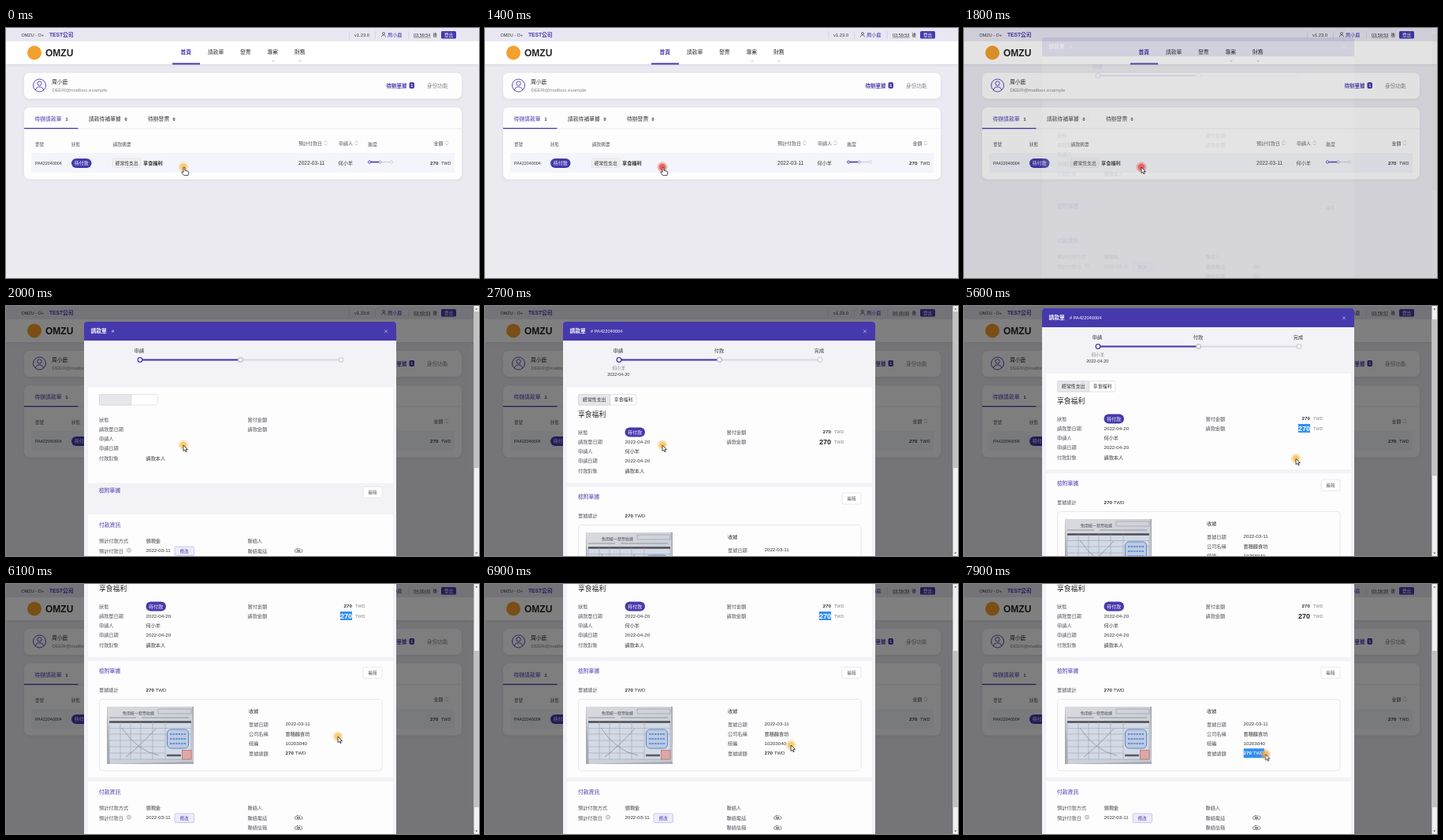
Write an HTML page that moves like this. It is 600x318 px and loops after 8000 ms.

```html
<!DOCTYPE html>
<html lang="zh-Hant">
<head>
<meta charset="utf-8">
<title>請款單</title>
<style>
html, body { margin: 0; width: 100%; height: 100%; overflow: hidden; background: #ebeaf0; }
svg { display: block; width: 600px; height: 318px; }
text {
  font: 6.2px "Liberation Sans", "Noto Sans CJK TC", "Noto Sans CJK", sans-serif;
  fill: #333; white-space: pre;
}
.s { font-size: 5.5px; }
.l { font-size: 6.8px; }
.b { font-weight: bold; }
.p { fill: #4539ad; }
.g { fill: #85858d; }
.w { fill: #fff; }
.m { text-anchor: middle; }
.label text { fill: #55555c; }

.shade, .modal, .bar, .scroll, .thumb, .late, .rows, .head2, .pay, .cursor, .hand, .arrow, .beam, .halo, .sel1, .sel2 {
  animation: 8s -20ms infinite step-end;
}
.shade { animation-name: shade; }
.modal { animation-name: modal; }
.bar { animation-name: bar; }
.scroll { animation-name: scroll; }
.thumb { animation-name: thumb; }
.late { animation-name: late; }
.rows { --d: -16px; animation-name: settle; }
.head2 { --d: -8px; animation-name: settle; }
.pay { --d: -118px; animation-name: settle; }
.cursor { animation-name: cursor; }
.hand { animation-name: hand; }
.arrow { animation-name: arrow; }
.beam { animation-name: beam; }
.halo { animation-name: halo; }
.sel1 { animation-name: sel1; }
.sel2 { animation-name: sel2; }

@keyframes shade {
  0% { opacity: 0; } 22.5% { opacity: .11; } 23.75% { opacity: .36; } 25%, 100% { opacity: .5; }
}
@keyframes modal {
  0% { opacity: 0; transform: translateY(-8px); }
  22.5% { opacity: .11; transform: translateY(-8px); }
  23.75% { opacity: .7; transform: translateY(-3px); }
  25%, 100% { opacity: 1; transform: none; }
}
@keyframes bar {
  0% { opacity: 0; } 22.5% { opacity: .11; } 23.75% { opacity: .7; } 25%, 100% { opacity: 1; }
}
@keyframes late { 0% { opacity: 0; } 28.75%, 100% { opacity: 1; } }
@keyframes settle { 0% { transform: translateY(var(--d)); } 28.75%, 100% { transform: none; } }
@keyframes scroll {
  0% { transform: none; }
  70% { transform: translateY(-17px); }
  71.25% { transform: translateY(-52px); }
  72.5% { transform: translateY(-89px); }
  73.75% { transform: translateY(-117px); }
  75%, 100% { transform: translateY(-132px); }
}
@keyframes thumb {
  0% { transform: none; }
  70% { transform: translateY(10px); }
  71.25% { transform: translateY(31px); }
  72.5% { transform: translateY(53px); }
  73.75% { transform: translateY(69px); }
  75%, 100% { transform: translateY(78px); }
}
@keyframes cursor {
  0% { transform: translate(225px, 177px); }
  48.75% { transform: translate(225px, 177px); animation-timing-function: steps(5); }
  55% { transform: translate(424px, 173px); }
  56.25% { transform: translate(424px, 173px); animation-timing-function: steps(3); }
  60% { transform: translate(439px, 173px); }
  61.25% { transform: translate(439px, 173px); animation-timing-function: steps(4); }
  66.25% { transform: translate(421px, 194px); }
  82.5% { transform: translate(421px, 194px); animation-timing-function: steps(6); }
  90% { transform: translate(355px, 216px); }
  93.75% { transform: translate(355px, 216px); animation-timing-function: steps(4); }
  98.75%, 100% { transform: translate(382.5px, 216.5px); }
}
@keyframes hand { 0% { opacity: 1; } 22.5%, 100% { opacity: 0; } }
@keyframes arrow {
  0% { opacity: 0; } 22.5% { opacity: 1; } 55% { opacity: 0; } 62.5% { opacity: 1; }
  90% { opacity: 0; } 98.75%, 100% { opacity: 1; }
}
@keyframes beam {
  0% { opacity: 0; } 55% { opacity: 1; } 62.5% { opacity: 0; }
  90% { opacity: 1; } 98.75%, 100% { opacity: 0; }
}
@keyframes halo {
  0% { fill: #f8bd4c; } 17.5% { fill: #ee4040; } 25% { fill: #f8bd4c; }
  56.25% { fill: #f58220; } 61.25% { fill: #f8bd4c; } 93.75%, 100% { fill: #f7a63c; }
}
@keyframes sel1 {
  0% { width: 0; }
  56.25% { width: 0; animation-timing-function: steps(3); }
  60% { width: 15px; }
  92.5%, 100% { width: 0; }
}
@keyframes sel2 {
  0% { width: 0; }
  93.75% { width: 0; animation-timing-function: steps(4); }
  98.75%, 100% { width: 26.5px; }
}
</style>
</head>
<body>
<svg viewBox="0 0 600 318">
<defs>
  <clipPath id="clip1"><rect class="sel1" x="424" y="166" width="0" height="13"/></clipPath>
  <clipPath id="clip2"><rect class="sel2" x="354.5" y="341" width="0" height="13"/></clipPath>
  <filter id="soft" x="-10%" y="-20%" width="120%" height="150%">
    <feDropShadow dx="0" dy="1" stdDeviation="1.5" flood-color="#55557a" flood-opacity=".12"/>
  </filter>
  <linearGradient id="paper" x2="1" y2="1">
    <stop stop-color="#d9dade"/><stop offset="1" stop-color="#c3c9d4"/>
  </linearGradient>
  <path id="sort" d="M-2-.8 0-2.8 2-.8M-2 .8 0 2.8 2 .8" fill="none" stroke="#9a9aa2" stroke-width=".6"/>
</defs>

<!-- page -->
<rect width="600" height="318" fill="#ebeaf0"/>
<rect y="17" width="600" height="29" fill="#fff" filter="url(#soft)"/>
<rect width="600" height="17" fill="#e8e7f2"/>
<text x="19.5" y="10.5" class="s">OMZU - O+</text>
<text x="55" y="11" class="b p" style="font-size:6.7px">TEST公司</text>
<path d="M435.5 4v10M468.5 4v10M510.5 4v10" stroke="#cfced9" stroke-width=".7"/>
<text x="442" y="10.5" style="font-size:5.8px">v1.23.0</text>
<g fill="none" stroke="#44444c" stroke-width=".7"><circle cx="479" cy="7" r="1.5"/><path d="M476.4 11.5c0-3.4 5.2-3.4 5.2 0"/></g>
<text x="484" y="10.8" class="p">周小鹿</text>
<text x="517" y="10.5" class="s" id="clock">03:59:54</text>
<path d="M517 12h21.5" stroke="#55555c" stroke-width=".6"/>
<text x="541.5" y="10.8" class="s">後</text>
<rect x="552" y="4" width="19" height="9.5" rx="1.5" fill="#4539ad"/>
<text x="561.5" y="10.8" class="s w m">登出</text>

<circle cx="36" cy="31.5" r="9" fill="#f3a02c"/>
<text x="50" y="35.5" class="b" style="font-size:12px;fill:#222">OMZU</text>
<text x="221.5" y="33.3" class="l b p">首頁</text>
<text x="256" y="33.3" class="l">請款單</text>
<text x="297" y="33.3" class="l">發票</text>
<text x="331.5" y="33.3" class="l">專案</text>
<text x="366" y="33.3" class="l">財務</text>
<path d="M337.6 41.5l1.4 1.2 1.4-1.2M371.6 41.5l1.4 1.2 1.4-1.2" fill="none" stroke="#888" stroke-width=".6"/>
<rect x="211" y="44.5" width="35" height="2" fill="#4539ad"/>

<rect x="23" y="57" width="555" height="33" rx="7" fill="#fdfdfe" filter="url(#soft)"/>
<g fill="none" stroke="#4539ad" stroke-width=".9">
  <circle cx="42.5" cy="73" r="8"/><circle cx="42.5" cy="70.5" r="2.7"/><path d="M37.4 79c.6-5.5 9.6-5.5 10.2 0"/>
</g>
<text x="58" y="71.3" class="l">周小鹿</text>
<text x="58.5" y="80.7" class="g">DEER@mailbox.example</text>
<text x="482.5" y="75.5" class="p b" style="font-size:6.5px">待辦單據</text>
<rect x="511.5" y="69" width="6.5" height="8" rx="2" fill="#4539ad"/>
<text x="514.8" y="75" class="s w b m">1</text>
<text x="534" y="75.5" class="g" style="font-size:6.7px">身份功能</text>

<rect x="23" y="101" width="555" height="91.5" rx="7" fill="#fdfdfe" filter="url(#soft)"/>
<path d="M23 128h555" stroke="#e5e4ec" stroke-width=".8"/>
<path d="M23 127.6h68.5" stroke="#4539ad" stroke-width="1.2"/>
<text x="36.5" y="117.5" class="l p">待辦請款單</text><text x="75.5" y="117.5" class="s b">1</text>
<text x="105" y="117.5" class="l">請款待補單據</text><text x="150.5" y="117.5" class="s b">0</text>
<text x="180" y="117.5" class="l">待辦發票</text><text x="211.5" y="117.5" class="s b">0</text>
<g class="label">
  <text x="37" y="149.7" class="s">單號</text><text x="83" y="149.7" class="s">狀態</text>
  <text x="135.5" y="149.7" style="font-size:5.8px">請款摘要</text>
  <text x="371" y="148.6" style="font-size:6px">預計付款日</text><text x="422" y="148.6" style="font-size:6px">申請人</text>
  <text x="459" y="149.9" style="font-size:6px">進度</text><text x="542.5" y="148.6" style="font-size:6px">金額</text>
</g>
<use href="#sort" x="405.5" y="146.3"/><use href="#sort" x="444.5" y="146.3"/><use href="#sort" x="559" y="146.3"/>
<rect x="32" y="159" width="537" height="25" fill="#f3f5fa"/>
<text x="37" y="173.8" style="font-size:5.4px">PA422040004</text>
<rect x="83" y="166" width="25.5" height="12" rx="6" fill="#4539ad"/>
<text x="95.7" y="174.2" class="w m" style="font-size:5.9px">待付款</text>
<rect x="135.5" y="166" width="35.5" height="11.5" rx="1.5" fill="#f0f0f3" stroke="#dcdce2" stroke-width=".6"/>
<text x="138.7" y="174" style="font-size:5.8px">經常性支出</text>
<text x="174" y="174" class="b">享食福利</text>
<text x="371" y="173.7" style="font-size:6.6px">2022-03-11</text>
<text x="421.5" y="173.9">何小羊</text>
<path d="M461 170.5h28" stroke="#d2d1de" stroke-width="1.4"/><path d="M461 170.5h13" stroke="#4539ad" stroke-width="1.6"/>
<g fill="#fff" stroke="#4539ad" stroke-width=".9"><circle cx="461" cy="170.5" r="1.6"/><circle cx="474.5" cy="170.5" r="1.5" stroke="#8d86cc"/><circle cx="489" cy="170.5" r="1.6" stroke="#cccbd8"/></g>
<text x="538" y="173.8" class="b">270</text><text x="552" y="173.8" class="s">TWD</text>

<rect class="shade" width="600" height="318" opacity="0"/>

<!-- dialog -->
<g class="modal"><g class="scroll">
  <rect x="99" y="20" width="396" height="443" rx="3" fill="#f3f2f7"/>
  <path d="M99 44V23q0-3 3-3h390q3 0 3 3v21z" fill="#4539ad"/>
  <text x="107.5" y="33.7" class="l w b">請款單</text>
  <text x="134" y="33.5" class="w" style="font-size:5.7px"># <tspan class="late">PA422040004</tspan></text>
  <path d="M480 30.2l4 4m0-4l-4 4" stroke="#c9c5ee" stroke-width=".7"/>

  <path d="M170 68.5h255" stroke="#d9d8e0" stroke-width="2.2"/>
  <path d="M170 68.5h127" stroke="#4539ad" stroke-width="2.2"/>
  <g fill="#fff" stroke-width="1.3"><circle cx="170" cy="68.5" r="2.8" stroke="#4539ad"/><circle cx="297.5" cy="68.5" r="2.8" stroke="#bebdca"/><circle cx="425" cy="68.5" r="2.8" stroke="#cfced8"/></g>
  <text x="169" y="59.3" class="m">申請</text>
  <g class="late">
    <text x="297" y="59.3" class="m">付款</text><text x="424" y="59.3" class="m">完成</text>
    <text x="169.8" y="81" class="m g s">何小羊</text><text x="169.2" y="89.3" class="m s">2022-04-20</text>
  </g>

  <rect x="104" y="103" width="387" height="122" fill="#fdfdfe"/>
  <rect x="118.5" y="112.5" width="73.5" height="13.5" rx="1.5" fill="#fff" stroke="#d9d9df" stroke-width=".7"/>
  <rect x="118.5" y="112.5" width="40.5" height="13.5" rx="1.5" fill="#e6e6eb" stroke="#d3d3da" stroke-width=".7"/>
  <g class="late">
    <text x="124" y="121.4" style="font-size:5.9px">經常性支出</text><text x="163.8" y="121.4" style="font-size:5.9px">享食福利</text>
    <text x="118" y="141.3" style="font-size:8.8px;font-weight:500;fill:#222">享食福利</text>
  </g>
  <g class="rows">
    <g class="label">
      <text x="118" y="162.6">狀態</text><text x="118" y="174.8">請款單日期</text><text x="118" y="187.1">申請人</text>
      <text x="118" y="199.4">申請日期</text><text x="118" y="211.7">付款對象</text>
      <text x="306.5" y="162.6">實付金額</text><text x="306.5" y="174.9">請款金額</text>
    </g>
    <text x="177.5" y="211.7">請款本人</text>
    <g class="late">
      <rect x="177.5" y="154.5" width="25.5" height="12" rx="6" fill="#4539ad"/>
      <text x="190.2" y="162.7" class="w m" style="font-size:5.9px">待付款</text>
      <text x="177.5" y="174.6">2022-04-20</text><text x="177.5" y="187.1">何小羊</text><text x="177.5" y="199.1">2022-04-20</text>
      <text x="428.5" y="162.2" class="b">270</text><text x="443" y="162.2" class="s g">TWD</text>
      <text x="424" y="175.6" class="b" style="font-size:9px;fill:#222">270</text><text x="443" y="175" class="s g">TWD</text>
      <g clip-path="url(#clip1)">
        <rect x="424" y="167" width="15" height="11" fill="#338ff0"/>
        <text x="424" y="175.6" class="b w" style="font-size:9px">270</text>
      </g>
    </g>
  </g>

  <rect class="late" x="104" y="230" width="387" height="148" fill="#fdfdfe"/>
  <g class="head2">
    <text x="118" y="245.4" class="l p" style="font-weight:500">檢附單據</text>
    <rect x="453" y="238" width="24" height="14" rx="1.5" fill="#fff" stroke="#dfdfe5" stroke-width=".7"/>
    <text x="465" y="247" class="m s" style="fill:#66666d">編輯</text>
  </g>
  <g class="late">
    <text x="118" y="269.4" style="fill:#55555c">單據總計</text>
    <text x="177.5" y="269.2"><tspan class="b">270</tspan> TWD</text>
    <rect x="118.5" y="278.5" width="358.5" height="91" rx="4" fill="#fdfdfe" stroke="#e3e2e9" stroke-width=".8"/>

    <rect x="128" y="288" width="110" height="73" fill="#a8abb0"/>
    <path d="M128 288h108l2 70-106 3z" fill="url(#paper)"/>
    <path d="M131 309h104v45l-104 2z" fill="#d3dae5"/>
    <text x="148" y="297.8" style="font-size:5px;fill:#4a4a50">免用統一發票收據</text>
    <path d="M193 291h42v6h-42z" fill="none" stroke="#85868e" stroke-width=".5"/>
    <path d="M131 302h34M172 302h60" stroke="#8b8d95" stroke-width=".9"/>
    <path d="M131 307.5h104" stroke="#4c4c53" stroke-width="2.6"/>
    <path d="M131 315.5h104M131 323h104M131 331h71M131 339h71M131 347h71M131 355h104M131 307v48M145 307v48M158 307v48M171 307v48M186 307v48M202 307v48M235 307v48" fill="none" stroke="#8f99ab" stroke-width=".5"/>
    <path d="M147 315q20 30 47 35M190 316q-20 22-38 36" fill="none" stroke="#777a84" stroke-width=".6"/>
    <rect x="204.5" y="317" width="27" height="24" rx="5" fill="#bccbe3" stroke="#5f86c6" stroke-width="1"/>
    <path d="M208 323h20M208 329h20M208 335h20" stroke="#6b8fcb" stroke-width="2" stroke-dasharray="2.5 1"/>
    <path d="M204 350h18" stroke="#5b5b63" stroke-width="2.6"/>
    <rect x="223.5" y="343.5" width="11.5" height="11.5" fill="#dba9a5" stroke="#c66d6b" stroke-width=".8"/>

    <text x="308" y="295.5" style="font-weight:500">收據</text>
    <g class="label">
      <text x="308" y="312.6">單據日期</text><text x="308" y="324.8">公司名稱</text>
      <text x="308" y="337.2">統編</text><text x="308" y="349.6">單據總額</text>
    </g>
    <text x="354.5" y="312.4">2022-03-11</text><text x="354.5" y="324.8">雲穗麵食坊</text><text x="354.5" y="337">10203040</text>
    <text x="354.5" y="349.4"><tspan class="b">270</tspan> TWD</text>
    <g clip-path="url(#clip2)">
      <rect x="354.5" y="341.2" width="26.5" height="12" fill="#338ff0"/>
      <text x="354.5" y="349.4" class="w"><tspan class="b">270</tspan> TWD</text>
    </g>
  </g>

  <g class="pay">
    <rect x="104" y="383" width="387" height="72" fill="#fdfdfe"/>
    <text x="118" y="399.4" class="l p" style="font-weight:500">付款資訊</text>
    <g class="label">
      <text x="118" y="419.3">預計付款方式</text><text x="118" y="431.6">預計付款日</text>
      <text x="306.5" y="419.3">聯絡人</text><text x="306.5" y="431.6">聯絡電話</text><text x="306.5" y="444">聯絡信箱</text>
    </g>
    <circle cx="156" cy="428.7" r="2.5" fill="none" stroke="#777780" stroke-width=".6"/><path d="M156 427.2v2.8" stroke="#777780" stroke-width=".6"/>
    <text x="177.5" y="419.3">領現金</text><text x="177.5" y="431.4">2022-03-11</text>
    <rect x="214" y="424" width="24.5" height="11.5" rx="1.5" fill="#ecebf8" stroke="#bcb8e2" stroke-width=".7"/>
    <text x="226.2" y="431.8" class="m p s">修改</text>
    <text x="366" y="431.2">(無)</text><text x="366" y="443.6">(無)</text>
  </g>
</g></g>

<g class="bar">
  <rect x="593.5" width="6.5" height="318" fill="#f1f1f1"/>
  <path d="M595.2 4.4l1.6-1.8 1.6 1.8zM595.2 313.6l1.6 1.8 1.6-1.8z" fill="#666"/>
  <rect class="thumb" x="593.5" y="7" width="6.2" height="199" fill="#c1c1c1"/>
</g>

<!-- pointer -->
<g class="cursor">
  <g class="halo"><circle r="6.5" opacity=".35"/><circle r="4.2" opacity=".7"/></g>
  <path class="hand" d="M0 .6q1-1 1.9 0v3.6l4 1q1 .4.9 1.6l-.8 3.6H.6L-2.4 6.7q.3-1.4 2.4-.2z" fill="#fff" stroke="#222" stroke-width=".8"/>
  <path class="arrow" d="M0 0v7.6l1.8-1.6 1.2 2.7 1.3-.6-1.2-2.6h2.3z" fill="#fff" stroke="#222" stroke-width=".8"/>
  <path class="beam" d="M-1.4-3.6h2.8M0-3.6v7.2M-1.4 3.6h2.8" fill="none" stroke="#333" stroke-width=".7"/>
</g>
</svg>
<script>
const LOOP = 8000, LEAD = 20;
const clock = document.getElementById('clock');
const ticks = [
  [0, '03:59:54'], [800, '03:59:53'], [2300, '04:00:00'], [2800, '03:59:59'], [3700, '03:59:58'],
  [4800, '03:59:57'], [5800, '04:00:00'], [6900, '03:59:59'], [7900, '03:59:58']
];
let start;
function draw(now) {
  start ??= now;
  const t = (now - start + LEAD) % LOOP;
  const label = ticks.findLast(([at]) => at <= t)[1];
  if (clock.textContent !== label) clock.textContent = label;
  requestAnimationFrame(draw);
}
requestAnimationFrame(draw);
</script>
</body>
</html>
```
